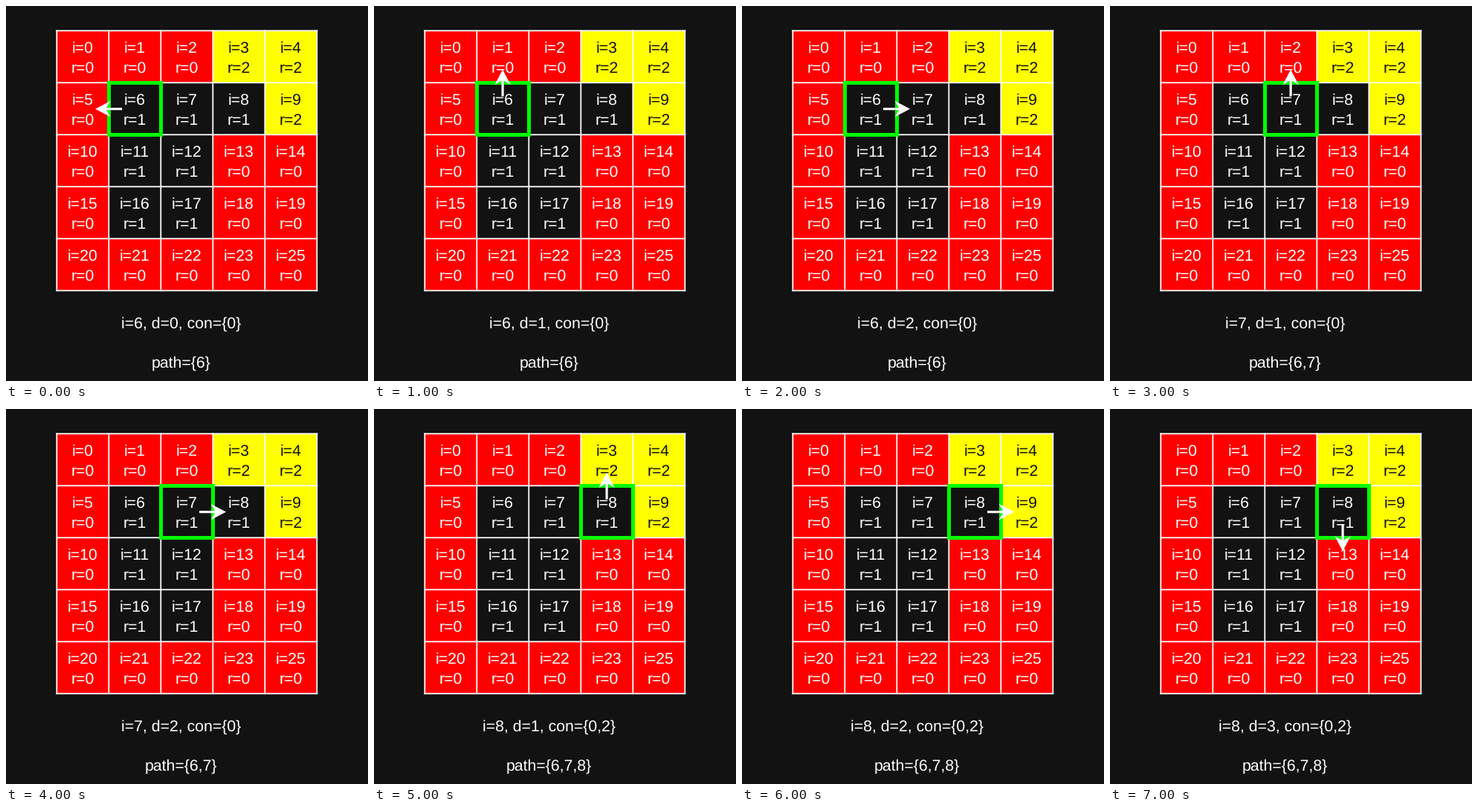
Recreate the animation shown at these times as a matplotlib script. Size 487 by 505 pixels, loop 8 s.

```python
import matplotlib.pyplot as plt
import numpy as np
from matplotlib.animation import FuncAnimation
from matplotlib.patches import Polygon, Rectangle

W, H, DPI = 487, 505, 100
PX = 72 / DPI
DARK, RED, YELLOW, GREEN = "#121212", "#ff0000", "#ffff00", "#00ff00"
LEFT, TOP, CELL = 68.3, 33.3, 70

plt.rcParams["text.hinting"] = "none"
fig = plt.figure(figsize=(W / DPI, H / DPI), dpi=DPI, facecolor=DARK)
ax = fig.add_axes([0, 0, 1, 1])
ax.set_xlim(0, W)
ax.set_ylim(H, 0)
ax.axis("off")


def label(x, y, text, color="white"):
    return ax.text(x, y, text, color=color, family="Liberation Sans",
                   size=21.33 * PX, ha="center", va="baseline", zorder=3)


# Region of every cell, row by row
REGIONS = "00022" "01112" "01100" "01100" "00000"
FILLS = {"0": RED, "1": DARK, "2": YELLOW}

for n, region in enumerate(REGIONS):
    row, col = divmod(n, 5)
    x, y = LEFT + col * CELL, TOP + row * CELL
    ax.add_patch(Rectangle((x, y), CELL, CELL, facecolor=FILLS[region],
                           edgecolor="none", snap=False))
    ink = DARK if region == "2" else "white"
    name = 25 if n == 24 else n
    label(x + 35, 63 + row * CELL, f"i={name}", ink)
    label(x + 35, 90 + row * CELL, f"r={region}", ink)

span = 5 * CELL
for k in range(6):
    x, y = LEFT + k * CELL, TOP + k * CELL
    style = dict(color="white", lw=1.8 * PX, snap=False, zorder=2,
                 solid_capstyle="projecting")
    ax.plot([x, x], [TOP, TOP + span], **style)
    ax.plot([LEFT, LEFT + span], [y, y], **style)

cursor = ax.add_patch(Rectangle((0, 0), CELL, CELL, fill=False, edgecolor=GREEN,
                                lw=5 * PX, snap=False, zorder=4))

# Arrow pointing right, relative to the cell centre
ARROW = np.array([(17, -1.6), (38, -1.6), (32.5, -10.7), (53, 0),
                  (32.5, 10.7), (38, 1.6), (17, 1.6)])
HEADINGS = [(-1, 0), (0, -1), (1, 0), (0, 1)]
arrow = ax.add_patch(Polygon(ARROW, facecolor="white", edgecolor="none",
                             snap=False, zorder=5))

status = label(235.7, 434, "")
path = label(235.7, 487, "")

# (cell, direction) visited at each step
STEPS = [(6, 0), (6, 1), (6, 2), (7, 1), (7, 2), (8, 1), (8, 2), (8, 3)]


def update(step):
    cell, d = STEPS[step]
    row, col = divmod(cell, 5)
    x, y = 68.5 + col * CELL, 33.5 + row * CELL
    cursor.set_xy((x, y))

    dx, dy = HEADINGS[d]
    turn = np.array([(dx, dy), (-dy, dx)])
    arrow.set_xy(ARROW @ turn + (x + 34.6, y + 35.1))

    found = "0,2" if cell == 8 else "0"
    trail = ",".join(str(c) for c in range(6, cell + 1))
    status.set_text(f"i={cell}, d={d}, con={{{found}}}")
    path.set_text(f"path={{{trail}}}")
    return cursor, arrow, status, path


anim = FuncAnimation(fig, update, frames=len(STEPS), interval=1000,
                     repeat=True, repeat_delay=0)
plt.show()
```
